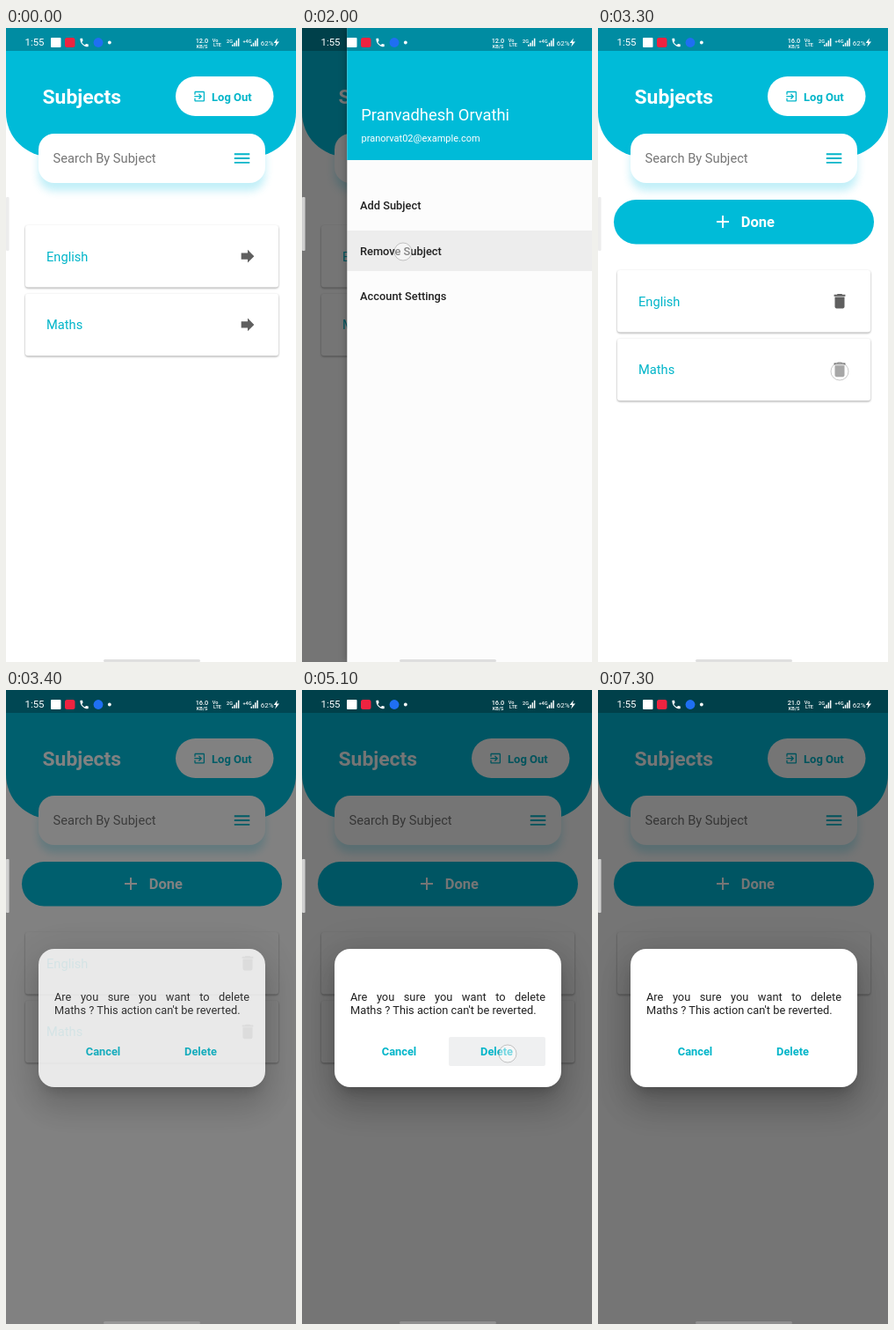
Animation, 330 px wide and 720 px high, one loop 8000 ms. Source, as an HTML page:

```html
<!DOCTYPE html>
<html lang="en">
<head>
<meta charset="utf-8">
<title>Subjects</title>
<style>
  html, body { margin: 0; width: 330px; height: 720px; overflow: hidden; background: #fff; }
  svg { display: block; font-family: Roboto, sans-serif; }
  .cyan { fill: #00bbd8; }
  .teal { fill: #00b5c9; }
  .white { fill: #fff; }
  .grey { fill: #5f5f5f; }
  .bold { font-weight: 700; }
  .body { font-size: 14.67px; }
  .small { font-size: 12.83px; }
  .item { font-size: 12.83px; font-weight: 500; fill: #212121; }
  .search { filter: drop-shadow(0 9px 5px rgba(0, 188, 225, .24)); }
  .sheet { filter: drop-shadow(0 1px 1.2px rgba(0, 0, 0, .36)); }
  #drawer { filter: drop-shadow(0 0 5px rgba(0, 0, 0, .3)); }
  #dialog { position: absolute; left: 37px; top: 294px; width: 258px; height: 157px;
    border-radius: 18px; background: #fff; color: #212121;
    font: 12.83px/15px Roboto, sans-serif;
    box-shadow: 0 10px 14px -6px rgba(0, 0, 0, .2), 0 22px 35px 3px rgba(0, 0, 0, .14), 0 8px 42px 7px rgba(0, 0, 0, .12); }
  #dialog p { position: absolute; left: 18px; top: 47px; width: 222px; margin: 0; }
  #dialog p span { display: block; white-space: nowrap; }
  #dialog p span:first-child { text-align-last: justify; }
  #dialog b { position: absolute; top: 100px; width: 110px; height: 33px; line-height: 33px;
    text-align: center; color: #00b5c9; border-radius: 2px; }
  #cancel { left: 18.5px; }
  #delete { left: 129.5px; }
</style>
</head>
<body>
<svg width="330" height="720" viewBox="0 0 330 720">
  <defs>
    <path id="exit" d="M10.09 15.59L11.5 17l5-5-5-5-1.41 1.41L12.67 11H3v2h9.67zM19 3H5c-1.11 0-2 .9-2 2v4h2V5h14v14H5v-4H3v4c0 1.1.89 2 2 2h14c1.1 0 2-.9 2-2V5c0-1.1-.9-2-2-2z"/>
    <path id="menu" d="M3 18h18v-2H3zm0-5h18v-2H3zm0-7v2h18V6z"/>
    <path id="bin" d="M6 19c0 1.1.9 2 2 2h8c1.1 0 2-.9 2-2V7H6zM19 4h-3.5l-1-1h-5l-1 1H5v2h14z"/>
    <path id="arrow" d="M12 8V4l8 8-8 8v-4H4V8z"/>
    <path id="plus" d="M19 13h-6v6h-2v-6H5v-2h6V5h2v6h6z"/>
    <path id="phone" d="M6.62 10.79c1.44 2.83 3.76 5.14 6.59 6.59l2.2-2.2c.27-.27.67-.36 1.02-.24 1.12.37 2.33.57 3.57.57.55 0 1 .45 1 1V20c0 .55-.45 1-1 1-9.39 0-17-7.61-17-17 0-.55.45-1 1-1h3.5c.55 0 1 .45 1 1 0 1.25.2 2.45.57 3.57.11.35.03.74-.25 1.02z"/>
    <path id="signal" d="M0 9v-2h1.5v2zM2.3 9v-4h1.5v4zM4.6 9v-6.5h1.5v6.5zM6.9 9v-9h1.5v9z"/>
  </defs>

  <rect width="330" height="720" fill="#fff"/>
  <path class="cyan" d="M0 0h330v96a50 50 0 0 1-50 50H50a50 50 0 0 1-50-50z"/>
  <text class="white bold" x="41.5" y="86" font-size="22.9">Subjects</text>
  <rect class="white" x="193" y="55" width="111.5" height="45" rx="22.5"/>
  <use class="teal" href="#exit" transform="translate(212.4 69.9) scale(.65)"/>
  <text class="teal bold" x="234" y="82.5" font-size="13">Log Out</text>
  <rect class="white search" x="37" y="120" width="258" height="56" rx="18"/>
  <text class="body" x="53.5" y="153.3" fill="#757575">Search By Subject</text>
  <use class="teal" href="#menu" transform="translate(256.9 136.4) scale(.97)"/>

  <g id="done">
    <rect class="cyan" x="18" y="195" width="296" height="50.5" rx="25.2"/>
    <use class="white" href="#plus" transform="translate(130 208)"/>
    <text class="white bold" x="162.7" y="226" font-size="16.5">Done</text>
  </g>
  <g id="list"></g>

  <rect id="shade" width="330" height="720"/>
  <g id="drawer">
    <rect width="290" height="720" fill="#fcfcfc"/>
    <rect class="cyan" width="290" height="150"/>
    <text class="white" x="16" y="105" font-size="18.33">Pranvadhesh Orvathi</text>
    <text class="white" x="16.2" y="128.5" font-size="11">pranorvat02@example.com</text>
    <rect id="press" y="230" width="290" height="46" opacity=".06"/>
    <text class="item" x="14.7" y="206">Add Subject</text>
    <text class="item" x="14.7" y="257.7">Remove Subject</text>
    <text class="item" x="14.7" y="309.3">Account Settings</text>
  </g>

  <rect id="barrier" width="330" height="720"/>
  <foreignObject width="330" height="720">
    <div id="dialog">
      <p><span>Are you sure you want to delete</span><span>Maths ? This action can't be reverted.</span></p>
      <b id="cancel">Cancel</b><b id="delete">Delete</b>
    </div>
  </foreignObject>

  <rect width="330" height="26" opacity=".25"/>
  <g class="white">
    <text x="21.5" y="20.3" font-size="11.4">1:55</text>
    <rect x="51" y="11" width="11.5" height="11" rx="1"/>
    <rect x="67" y="11" width="11.5" height="11" rx="2.5" fill="#ee2340"/>
    <use href="#phone" transform="translate(82.8 10.3) scale(.52)"/>
    <circle cx="105" cy="16.5" r="5.4" fill="#1f6ff2"/>
    <circle cx="117.8" cy="16.5" r="1.9"/>
    <g text-anchor="middle" font-weight="500">
      <text id="rate" x="223" y="17" font-size="7.4"></text>
      <text x="223" y="23" font-size="5.6">KB/S</text>
      <text x="238" y="16.2" font-size="5.6">Vo</text>
      <text x="240.5" y="21.2" font-size="5.6">LTE</text>
      <text x="254.5" y="16.5" font-size="5.6">2G</text>
      <text x="274.5" y="16.5" font-size="5.6">+4G</text>
    </g>
    <use href="#signal" transform="translate(257 11.7)"/>
    <use href="#signal" transform="translate(278.5 11.7)"/>
    <text x="289.7" y="20" font-size="8">62%</text>
    <path d="M309 11.5l-4.4 5.6h2.8l-1.2 4.4 4.8-6h-3z"/>
  </g>
  <rect id="edge" y="192" width="3.6" height="61" rx="1"/>
  <rect x="111" y="717" width="110" height="3" rx="1.5" fill="#b4b4b4" opacity=".42"/>
  <circle id="touch" r="10" fill="#fff" fill-opacity=".45" stroke="#888" stroke-opacity=".45"/>
</svg>

<script>
const LOOP = 8000, OPEN = 705, CLOSE = 2200, ASK = 3303, REMOVE = 5300;
const DRAWER_W = 278.7;
const taps = [[690, 780, 268, 148], [2000, 2120, 115, 254], [3210, 3370, 275, 390], [4960, 5190, 234, 413]];
const rates = [[6400, '21.0'], [2380, '16.0'], [0, '12.0']];

const $ = id => document.getElementById(id);
const show = (el, on) => { el.style.visibility = on ? 'visible' : 'hidden'; };
const clamp = v => Math.min(1, Math.max(0, v));

$('list').innerHTML = ['English', 'Maths'].map((name, i) => `
  <g transform="translate(0 ${i * 77.7})">
    <rect class="white sheet" x="22" y="224" width="288" height="70.5" rx="3"/>
    <text class="teal body" x="46" y="264.7">${name}</text>
    <use class="grey arrow" href="#arrow" transform="translate(264 248.2) scale(.917)"/>
    <use class="grey bin" href="#bin" transform="translate(264 248.2) scale(.917)"/>
  </g>`).join('');
const cards = [...$('list').children];

// Critically damped settle, from 1 to 0.
function settle(ms) {
  const x = 22.4 * Math.max(0, ms) / 1000;
  return (1 + x) * Math.exp(-x);
}

function bezier(x1, y1, x2, y2) {
  const at = (a, b, s) => 3 * a * s * (1 - s) ** 2 + 3 * b * s * s * (1 - s) + s ** 3;
  return x => {
    let lo = 0, hi = 1;
    for (let i = 0; i < 24; i++) {
      const mid = (lo + hi) / 2;
      if (at(x1, x2, mid) < x) lo = mid; else hi = mid;
    }
    return at(y1, y2, hi);
  };
}
const ease = bezier(.25, .1, .25, 1), easeOut = bezier(0, 0, .58, 1);

function render(t) {
  const open = t < CLOSE ? 1 - settle(t - OPEN) : settle(t - CLOSE);
  const editing = t >= CLOSE;
  const fade = clamp((t - ASK) / 150);

  $('drawer').setAttribute('transform', `translate(${330 - DRAWER_W * open} 0)`);
  show($('drawer'), open > .002);
  $('shade').setAttribute('opacity', .54 * open);
  show($('press'), t >= 2000 && t < 2230);

  show($('done'), editing);
  $('list').setAttribute('transform', `translate(0 ${editing ? 51 : 0})`);
  cards.forEach((card, i) => {
    const there = i === 0 || t < REMOVE;
    show(card, there);
    show(card.querySelector('.arrow'), there && !editing);
    show(card.querySelector('.bin'), there && editing);
  });

  $('barrier').setAttribute('opacity', .54 * ease(fade));
  $('dialog').style.opacity = fade && easeOut(fade);
  const held = clamp((t - 4960) / 80) * clamp((5350 - t) / 150);
  $('delete').style.background = `rgba(70, 85, 95, ${.085 * held})`;

  const dark = Math.max(open, fade);
  $('edge').setAttribute('fill', dark > .5 ? '#cfcfcf' : '#ececec');
  $('rate').textContent = rates.find(r => t >= r[0])[1];

  const tap = taps.find(([from, to]) => t >= from && t < to);
  show($('touch'), tap);
  if (tap) $('touch').setAttribute('transform', `translate(${tap[2]} ${tap[3]})`);
}

const start = performance.now();
function tick() {
  render((performance.now() - start) % LOOP);
  requestAnimationFrame(tick);
}
tick();
</script>
</body>
</html>
```
